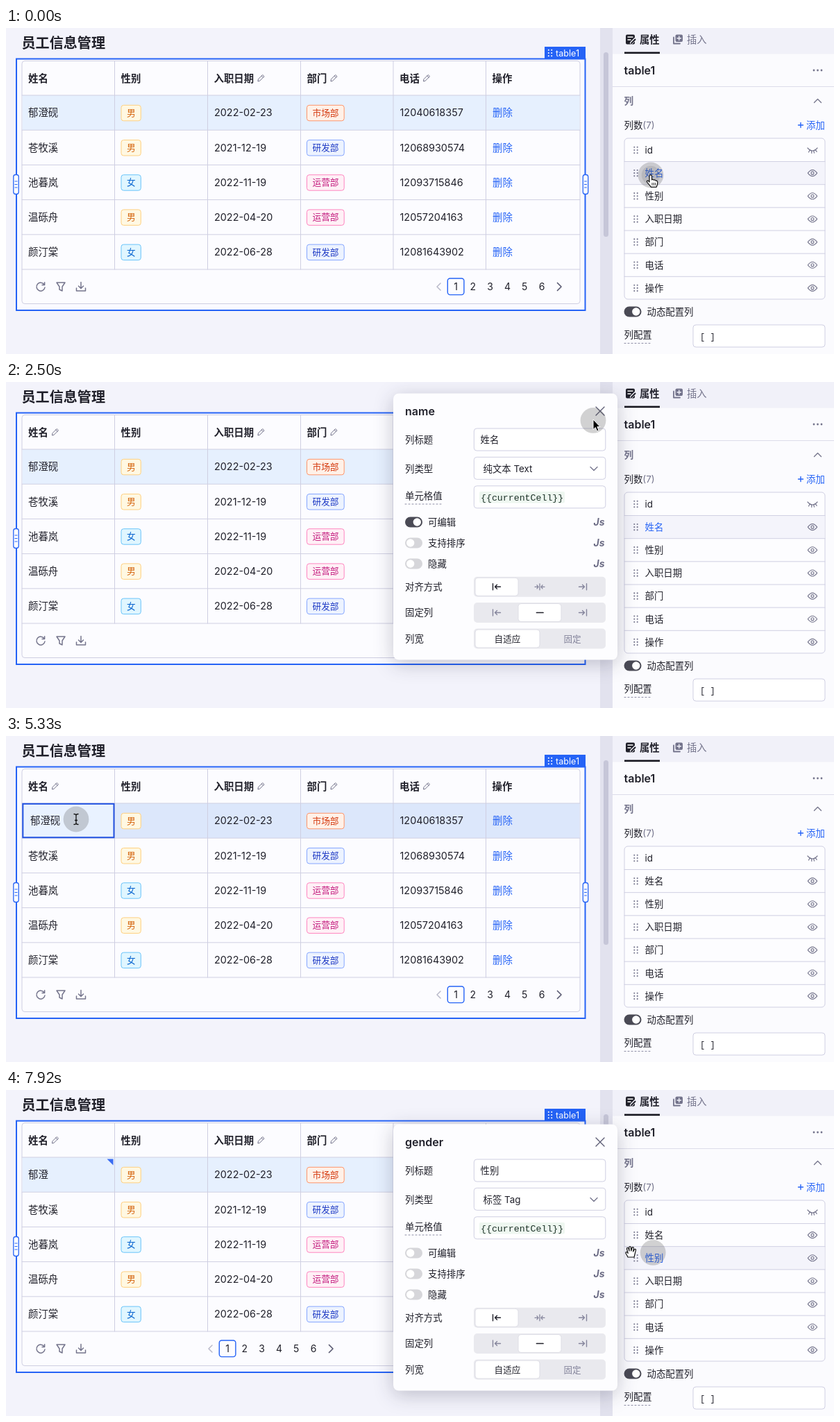
An HTML page for the animation above (8000 ms loop, 1193 by 470 pixels).

```html
<!DOCTYPE html>
<html lang="zh-CN">
<head>
<meta charset="utf-8">
<title>员工信息管理</title>
<style>
html, body { margin: 0; width: 100%; height: 100%; overflow: hidden; background: #f3f3fb; }
svg { display: block; width: 100%; height: 100%; font-family: Inter, "Noto Sans CJK SC", "Noto Sans CJK", sans-serif; }
text { white-space: pre; }
.mono { font-family: "Liberation Mono", monospace; }
.popup { filter: drop-shadow(0 6px 14px rgba(20, 20, 50, .24)); }
</style>
</head>
<body>
<svg id="stage" viewBox="0 0 1193 470"></svg>
<script>
const LOOP = 8000, STEP = 1000 / 12;
const INK = '#20202a', MUTED = '#74748c', BLUE = '#2563f6', LINE = '#cfcfe2', PAPER = '#fcfcff';

// Drawing helpers; text is placed by its vertical centre.
const text = (x, y, s, size = 13.4, fill = INK, more = '') =>
  `<text x="${x}" y="${y + size * .36}" font-size="${size}" fill="${fill}" ${more}>${s}</text>`;
const rect = (x, y, w, h, fill, stroke = 'none', r = 0, more = '') =>
  `<rect x="${x}" y="${y}" width="${w}" height="${h}" rx="${r}" fill="${fill}" stroke="${stroke}" ${more}/>`;
const path = (d, stroke = LINE, w = 1, more = '') =>
  `<path d="${d}" fill="none" stroke="${stroke}" stroke-width="${w}" stroke-linecap="round" stroke-linejoin="round" ${more}/>`;
const at = (x, y, body) => `<g transform="translate(${x} ${y})">${body}</g>`;
const group = (id, body, more = '') => `<g id="${id}" ${more}>${body}</g>`;
const BOLD = 'font-weight="600"', MID = 'text-anchor="middle"';

const dots = (x, y, fill) => [0, 1, 2, 3, 4, 5].map(i =>
  `<circle cx="${x + (i % 2 ? 2.2 : -2.2)}" cy="${y + (i >> 1) * 4.2 - 4.2}" r="1.05" fill="${fill}"/>`).join('');
const pencil = (x, y) => at(x, y, path('M-4.5 4.5L-4 1.7 2.2-4.5 4.6-2.2-1.7 4ZM.7-3 3.1-.7', MUTED));
const eye = (x, y) => at(x, y, path('M-6.7 0Q0-9 6.7 0 0 9-6.7 0Z', MUTED, 1.1) +
  `<circle r="2" fill="none" stroke="${MUTED}" stroke-width="1.1"/>`);
const closedEye = (x, y) => at(x, y, path('M-7-3Q0 5 7-3M-4 .2-5.5 3M-1.2 1.2V4.4M1.8 1.2 2.5 4.2M4.4-.2 6.2 2.3', MUTED, 1.2));
const toggle = (x, y, on) => rect(x, y - 7.5, 25, 15, on ? '#4a4a55' : '#d6d6da', 'none', 7.5) +
  `<circle cx="${x + (on ? 17.3 : 7.7)}" cy="${y}" r="5.7" fill="#fff"/>`;
const help = (x, y, w) => path(`M${x} ${y}h${w}`, '#8c8ca4', 1, 'stroke-dasharray="2 3"');

// Table
const COLS = [23, 156.5, 290.5, 424.5, 558, 691.5, 827];
const TAGS = {
  '男': ['#fff8e2', '#ffd07f', '#d4620a'], '女': ['#e0f6ff', '#69c4fa', '#0b66d0'],
  '市场部': ['#fff1e8', '#ff9468', '#d4380d'], '研发部': ['#edf3ff', '#85a5ff', '#1d39c4'],
  '运营部': ['#fff0f6', '#ff85c0', '#c41d7f']
};
const ROWS = [
  ['郁澄砚', '男', '2022-02-23', '市场部', '12040618357'],
  ['苍牧溪', '男', '2021-12-19', '研发部', '12068930574'],
  ['池暮岚', '女', '2022-11-19', '运营部', '12093715846'],
  ['温砾舟', '男', '2022-04-20', '运营部', '12057204163'],
  ['颜汀棠', '女', '2022-06-28', '研发部', '12081643902']
];
const FULL = ROWS[0][0], SHORT = FULL.slice(0, 2);

function tag(x, y, label) {
  const [fill, stroke, ink] = TAGS[label], w = label.length * 12.7 + 15.6;
  return rect(x + .5, y - 11, w, 22.5, fill, stroke, 3.5) + text(x + 8.5, y, label, 12.7, ink);
}

function tableRow([name, sex, date, dept, phone], i) {
  const y = 122.3 + i * 50.2;
  return (i ? text(32, y, name, 14.4) : '') + tag(165.5, y, sex) + text(300, y, date, 14.4) +
    tag(433, y, dept) + text(567.5, y, phone, 14.4) + text(701, y, '删除', 14.4, BLUE);
}

function table() {
  const heads = ['姓名', '性别', '入职日期', '部门', '电话', '操作'];
  const lines = COLS.slice(1, 6).map(x => `M${x} 48V348`).join('') +
    [0, 1, 2, 3, 4, 5].map(i => `M23 ${97 + i * 50.2}H827`).join('');
  const pages = [1, 2, 3, 4, 5, 6].map(n => text(623.2 + n * 24.8, 373, n, 14, INK, MID)).join('');
  const handle = x => rect(x - 3.7, 211.5, 7.4, 28, '#fff', BLUE, 3, 'stroke-width="1.3"') +
    path(`M${x - 1.6} 221h3.2m-3.2 4.5h3.2m-3.2 4.5h3.2`, BLUE);
  return text(22.5, 22, '员工信息管理', 20.1, INK, BOLD) +
    rect(15, 44.5, 819.5, 362.5, '#fafaff', BLUE, 0, 'stroke-width="2"') +
    rect(23, 47.5, 804, 350, PAPER, LINE, 4) +
    rect(23.5, 97, 303, 50, '#e6f0fe', 'none', 0, 'id="rowTint" style="width:803px"') +
    path(lines) +
    heads.map((h, i) => text(COLS[i] + 9, 72.5, h, 14.4, INK, BOLD)).join('') +
    [367.5, 472.5, 606].map(x => pencil(x, 72)).join('') +
    group('namePencil', pencil(71, 72)) +
    ROWS.map(tableRow).join('') +
    group('editBox', rect(24.3, 97.8, 131.2, 48.5, '#e9f2ff', '#2050e0', 0, 'stroke-width="2"')) +
    text(32, 122.3, FULL, 14.4, INK, 'id="editName"') +
    group('caret', rect(0, 113, 1.2, 18, INK)) +
    group('edited', '<path d="M145.5 99.5H154.5V108.5Z" fill="#3a6cf2"/>') +
    at(50, 373, path('M5.2-3A6 6 0 1 0 6 1M5.6-6.2V-2.6H2', MUTED, 1.5)) +
    at(79, 373, path('M-6-6H6L2 0V6L-2 4V0Z', MUTED, 1.5)) +
    at(108, 373, path('M0-6.5V2.5M-3.5-1 0 2.5 3.5-1M-6.5 2V6H6.5V2', MUTED, 1.5)) +
    group('pager', path('M626 368l-5 5 5 5', '#b9b9ca', 1.5) + rect(636.3, 361, 23.6, 23.6, PAPER, BLUE, 3.5, 'stroke-width="1.4"') +
      pages + path('M794.5 367.5l5.5 5.5-5.5 5.5', '#5c5c74', 1.7)) +
    handle(14.5) + handle(835) +
    rect(776, 27, 59, 18, BLUE) + dots(784, 36, '#fff') + text(792, 36, 'table1', 12.6, '#fff');
}

// Property sidebar
const FIELDS = ['id', '姓名', '性别', '入职日期', '部门', '电话', '操作'];

function sidebar() {
  const rowY = i => 176 + i * 33.15;
  return rect(856, 0, 18, 470, '#e2e2ee') + rect(861, 35, 7, 266, '#c6c6d8', 'none', 3.5) +
    rect(874, 0, 319, 470, '#fbfbfe') + rect(874, 0, 319, 37.5, '#f1f1f9') +
    rect(891, 34.5, 51, 2.6, '#17171f') +
    at(900, 16.5, rect(-7, -7, 13, 14, INK, 'none', 2) + path('M-4-3.5H3M-4 .5H0', '#fff', 1.4) + path('M1 5 7-1', '#f1f1f9', 4) + path('M1 5.5 6.5 0', INK, 2)) +
    text(913, 16.5, '属性', 14.3, INK, BOLD) +
    at(968, 16.5, rect(-3.5, -7, 10.5, 10.5, MUTED, 'none', 2) + path('M-6-3V6H3', MUTED, 1.8) + path('M1.8-4.5V1M-1-1.8H4.5', '#f1f1f9', 1.4)) +
    text(981, 16.5, '插入', 14.3, MUTED) +
    text(890.5, 61, 'table1', 16, INK, BOLD) +
    [1164, 1169.5, 1175].map(x => `<circle cx="${x}" cy="61" r="1.4" fill="${MUTED}"/>`).join('') +
    path('M874 84.5H1193', '#dcdcea') +
    text(890.5, 105, '列', 13.6, MUTED, BOLD) + path('M1164.5 107.5l5-5 5 5', MUTED, 1.4) +
    text(890.5, 140, `列数<tspan fill="${MUTED}">(7)</tspan>`) +
    path('M1141.5 140h7m-3.5-3.5v7', BLUE, 1.4) + text(1153, 140, '添加', 13.4, BLUE) +
    rect(891, 159, 289, 232, '#fdfdff', LINE, 5) +
    FIELDS.map((f, i) =>
      rect(891.5, rowY(i) - 16, 288, 32, '#f4f4fb', 'none', 0, `id="hover${i}"`) +
      (i ? path(`M891 ${rowY(i) - 16.6}H1180`) : '') +
      dots(907.5, rowY(i), MUTED) + text(920.5, rowY(i), f, 13.4, INK, `id="field${i}"`) +
      (i ? eye : closedEye)(1162, rowY(i))).join('') +
    toggle(890.5, 409, true) + text(923.5, 409, '动态配置列') +
    text(890.5, 442.5, '列配置') + help(891, 454.5, 40) +
    rect(990, 428, 190, 32, '#fff', LINE, 4) + text(1000, 445, '[ ]', 12, INK, 'class="mono" textLength="" xml:space="preserve"'.replace('textLength="" ', ''));
}

// Column settings popup
function popup(id, title, value, type, dy) {
  const box = y => rect(674.3, y, 189.5, 32, '#fff', LINE, 4);
  const bar = (y, x, w) => rect(674, y, 190, 29, '#e9e9ee', 'none', 5) + rect(x, y + 1.5, w, 26, '#fff', '#dedee6', 4);
  const left = (x, y, c) => path(`M${x - 5.5} ${y - 4.5}v9M${x + 5.5} ${y}h-8m3-3-3 3 3 3`, c, 1.4);
  const right = (x, y, c) => path(`M${x + 5.5} ${y - 4.5}v9M${x - 5.5} ${y}h8m-3-3 3 3-3 3`, c, 1.4);
  const both = (x, y) => path(`M${x} ${y - 4.5}v9M${x - 7} ${y}h5m-2-2.5 2 2.5-2 2.5M${x + 7} ${y}h-5m2-2.5-2 2.5 2 2.5`, '#85859c', 1.3);
  const option = (y, label, extra) => extra + text(608, y, label) +
    text(846.5, y, 'Js', 14, '#6d6d86', 'font-weight="700" font-style="italic"');
  const body = rect(558, 16.5, 323, 384, '#fdfdff', 'none', 8) +
    text(575, 42, title, 16, INK, BOLD) + path('M850 36l12 12m0-12-12 12', '#5e5e76', 1.4) +
    text(575, 83, '列标题') + box(67) + text(683.5, 83, value) +
    text(575, 124.8, '列类型') + box(108.3) + text(687.5, 124.8, type) + path('M842 122.5l5 5 5-5', MUTED, 1.3) +
    text(575, 164.5, '单元格值') + help(575, 176, 54) + box(149.8) +
    rect(682, 158, 123, 16.5, '#eef7f0', 'none', 2) + text(684, 166, '{{currentCell}}', 13.25, '#1e3329', 'class="mono"') +
    option(202, '可编辑', id === 'namePopup' ? group('offSwitch', toggle(575, 202, false)) + group('onSwitch', toggle(575, 202, true)) : toggle(575, 202, false)) +
    option(232, '支持排序', toggle(575, 232, false)) + option(262, '隐藏', toggle(575, 262, false)) +
    text(575, 295.5, '对齐方式') + bar(280.8, 676, 62) + left(707, 295.3, INK) + both(769, 295.3) + right(831, 295.3, '#85859c') +
    text(575, 332.5, '固定列') + bar(318, 738, 62) + left(707, 332.5, '#85859c') + path('M764.5 332.5h9.5', INK, 1.7) + right(831, 332.5, '#85859c') +
    text(575, 370, '列宽') + bar(355.5, 676, 93) + text(722.5, 370, '自适应', 12.6, INK, MID + ' font-weight="500"') + text(816, 370, '固定', 12.6, '#85859c', MID);
  return group(id, body, `class="popup" transform="translate(0 ${dy})"`);
}

// Pointer shapes, hot spot at the origin
const skin = 'fill="#fff" stroke="#111" stroke-width="1.2" stroke-linejoin="round"';
const POINTERS = {
  hand: `<path ${skin} d="M-2 1.5C-2-.6 1.5-.6 1.5 1.5V7C2.2 5.8 4 6 4.4 7.4 5.4 6.5 7 7 7.3 8.4 8.6 7.8 9.8 8.6 9.8 10.2 9.8 14 8.8 15 8.2 17.3H.4C-1.4 14.6-5.2 11-5.6 9.6-6 8-4 7.6-3 8.8L-2 10Z"/>` +
    path('M2 11.5v3m2.3-3v3m2.3-3v3', '#111', .9),
  arrow: '<path fill="#000" stroke="#fff" d="M0 0V14.5L3.3 11.5 5.5 16.8 8 15.7 5.8 10.6H10Z"/>',
  beam: path('M-3-7.5Q0-7.5 0-5.5 0-7.5 3-7.5M0-6V6M-3 7.5Q0 7.5 0 5.5 0 7.5 3 7.5M-1.5 1.5h3', '#111', 1.3),
  grab: `<path ${skin} d="M-4 8C-5.5 4-8 2.5-7 1-6 0-4.5 1-3.8 2.5L-5.5-4C-5.8-6-3.6-6.4-3-4.5L-2-1-2.2-6C-2.2-8 .2-8 .4-6L.8-1 2-5.5C2.5-7.2 4.6-6.6 4.3-4.8L3.6 0 5.4-3C6.4-4.4 8-3.2 7.4-1.8L5 8Z"/>`
};
const HALO = '<circle r="18.4" fill="#444" opacity=".24"/>';

// Pointer track: [step, x, y]
const TRACK = [
  [4, 929, 212], [5, 912, 212], [6, 835, 212], [7, 745, 212], [8, 698, 212], [9, 684, 212], [10, 684, 212],
  [11, 620, 210], [12, 603, 208], [13, 603, 208], [14, 592, 206.5], [22, 593, 206], [24, 650, 172], [26, 785, 92],
  [28, 840, 61], [29, 846, 56], [30, 846, 54], [32, 850, 44], [42, 850, 44], [43, 835, 46], [44, 770, 52],
  [45, 640, 60], [46, 514, 70], [47, 397, 93], [48, 275, 110], [49, 188, 120], [50, 188, 120], [51, 112, 120], [52, 101, 120],
  [74, 101, 120], [75, 150, 132], [76, 400, 165], [77, 710, 196], [78, 876, 211], [79, 922, 221], [81, 940, 230],
  [84, 947, 235], [93, 947, 235], [94, 946, 235], [95, 900, 233]
];
// Pointer shape from a given step on
const SHAPES = [[0, 'hand'], [5, 'arrow'], [14, 'hand'], [23, 'arrow'], [32, 'hand'], [43, 'arrow'],
  [57, 'beam'], [70, ''], [75, 'arrow'], [78, 'hand'], [95, 'grab']];
const PRESSES = [[0, 4], [15, 20], [37, 48], [55, 57], [58, 60], [85, 88]];
const CARETS = [[58, 64], [68, 75], [81, 87]];

const within = (list, n) => list.some(([a, b]) => n >= a && n < b);

function pointAt(n) {
  const i = TRACK.findIndex(p => p[0] >= n);
  if (i < 0) return TRACK.at(-1).slice(1);
  if (i === 0) return TRACK[0].slice(1);
  const [a, x0, y0] = TRACK[i - 1], [b, x1, y1] = TRACK[i], k = (n - a) / (b - a);
  return [x0 + (x1 - x0) * k, y0 + (y1 - y0) * k];
}

const stage = document.getElementById('stage');
stage.innerHTML = table() + sidebar() +
  popup('namePopup', 'name', '姓名', '纯文本 Text', 0) +
  popup('genderPopup', 'gender', '性别', '标签 Tag', 33) +
  group('halo', HALO + group('press', '<circle r="13.3" fill="#444" opacity=".13"/>')) +
  group('pointer', Object.entries(POINTERS).map(([k, v]) => group(k, v)).join(''));

const el = id => document.getElementById(id);
const fade = (id, v) => el(id).setAttribute('opacity', +v);
const move = (id, [x, y]) => el(id).setAttribute('transform', `translate(${x} ${y})`);

function render(n) {
  const editing = n >= 57 && n < 87, cut = n >= 68;
  fade('namePopup', n < 2 || n > 42 ? 0 : n === 2 || n === 42 ? .55 : 1);
  fade('genderPopup', n < 91 ? 0 : n === 91 ? .55 : 1);
  fade('offSwitch', n < 21);
  fade('onSwitch', n < 20 ? 0 : n === 20 ? .5 : 1);
  fade('namePencil', n >= 21);

  const active = n < 43 ? 1 : n >= 91 ? 2 : 0;
  FIELDS.forEach((_, i) => {
    const on = i > 0 && i === active;
    el('field' + i).setAttribute('fill', on ? BLUE : INK);
    fade('hover' + i, on);
  });

  el('rowTint').setAttribute('fill', n >= 49 && n < 76 ? '#dce7fb' : '#e6f0fe');
  fade('editBox', editing);
  fade('edited', n >= 87);
  el('editName').textContent = cut ? SHORT : FULL;
  el('editName').setAttribute('x', editing ? 35 : 32);
  fade('caret', within(CARETS, n));
  move('caret', [cut ? 63.8 : 77.6, 0]);
  move('pager', [n >= 88 ? -329 : 0, 0]);

  // The halo trails the pointer by a fraction of a step.
  move('pointer', pointAt(n));
  move('halo', pointAt(n - .7));
  fade('press', within(PRESSES, n));
  const shape = SHAPES.filter(s => s[0] <= n).at(-1)[1];
  Object.keys(POINTERS).forEach(k => fade(k, k === shape));
}

const start = performance.now();
function tick() {
  const t = (performance.now() - start) % LOOP;
  render(Math.min(95, Math.floor((t + 4) / STEP)));
  requestAnimationFrame(tick);
}
tick();
</script>
</body>
</html>
```
